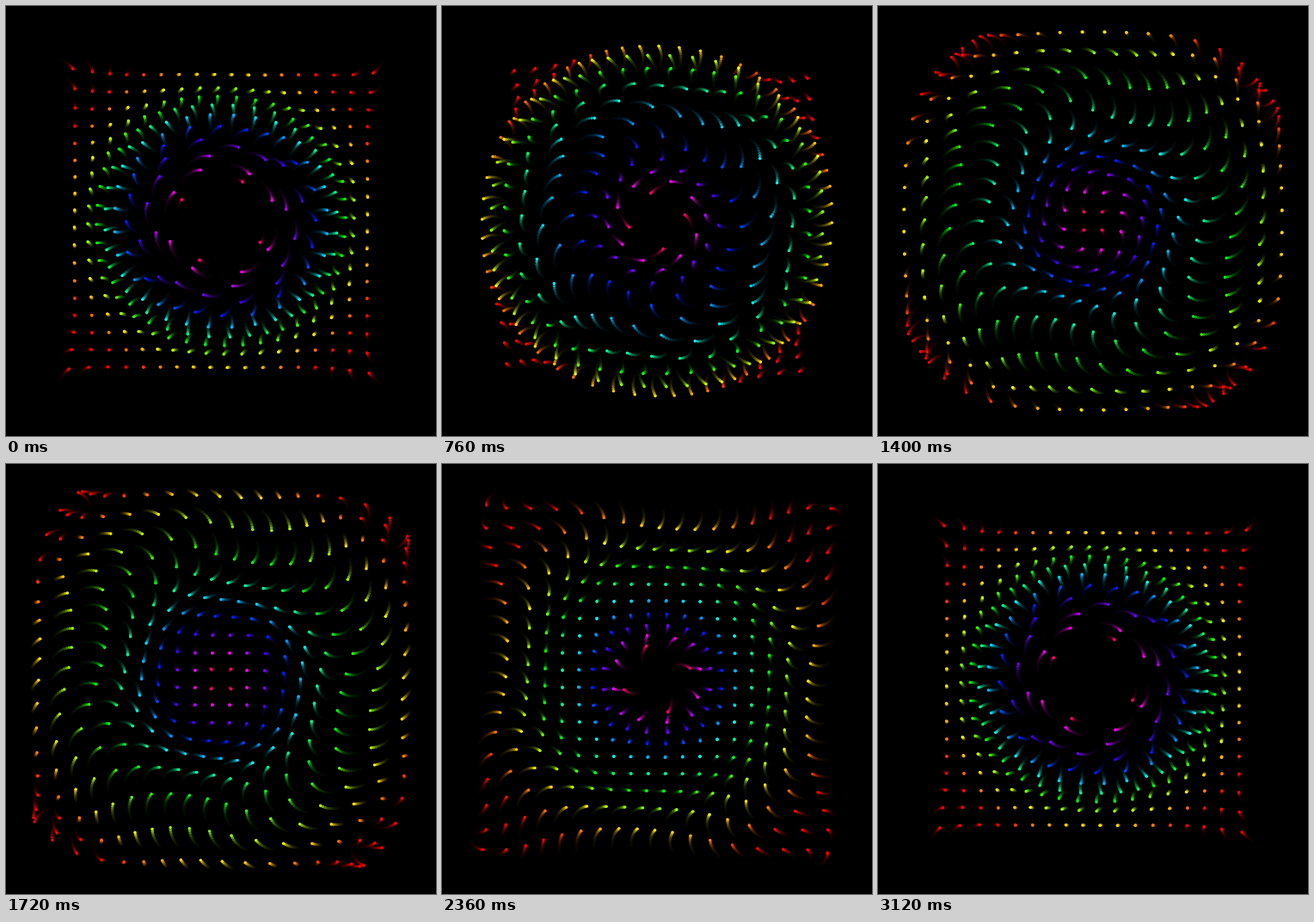
Recreate the animation shown at these times as an HTML page with a canvas. Size 500 by 500 pixels, loop 3160 ms.

```html
<!DOCTYPE html>
<html lang="en">
<head>
<meta charset="utf-8">
<title>Swirling dot grid</title>
<style>
  html, body { margin: 0; width: 100%; height: 100%; overflow: hidden; background: #000; }
  canvas { display: block; width: 500px; height: 500px; }
</style>
</head>
<body>
<canvas id="stage" width="500" height="500"></canvas>
<script>
const ctx = document.getElementById('stage').getContext('2d');
const SIZE = 500, CENTER = SIZE / 2, TAU = Math.PI * 2;
const STEP = 40, FRAMES = 79;          // ms per frame, frames per loop
const COUNT = 18, GAP = 20, DOT = 1.8;
const REACH = 50, WAVE = 0.018, LEAD = 5.2;
const TRAIL = 9, FADE = 0.67;

const dots = [];
for (let row = 0; row < COUNT; row++) {
  for (let col = 0; col < COUNT; col++) {
    const x = (col - (COUNT - 1) / 2) * GAP;
    const y = (row - (COUNT - 1) / 2) * GAP;
    const r = Math.hypot(x, y);
    dots.push({ x, y, r, heading: Math.atan2(y, x), hue: Math.max(0, 360 - 1.8 * r) });
  }
}

const swell = angle => (1 + Math.cos(angle)) / 2;

// Each dot leaves its grid place by a distance and a turn that ripple outwards.
function place(dot, frame) {
  const phase = TAU * (frame + LEAD) / FRAMES;
  const push = REACH * swell(phase - WAVE * dot.r);
  const turn = Math.PI / 2 * swell(phase - 2 * WAVE * dot.r);
  return [
    CENTER + dot.x + push * Math.cos(dot.heading + turn),
    CENTER + dot.y + push * Math.sin(dot.heading + turn)
  ];
}

function draw(frame) {
  ctx.fillStyle = '#000';
  ctx.fillRect(0, 0, SIZE, SIZE);
  for (let age = TRAIL; age >= 0; age--) {
    const light = 50 * FADE ** age;
    for (const dot of dots) {
      const [x, y] = place(dot, frame - age);
      ctx.fillStyle = `hsl(${dot.hue}, 100%, ${light}%)`;
      ctx.beginPath();
      ctx.arc(x, y, DOT, 0, TAU);
      ctx.fill();
    }
  }
}

const start = performance.now();
let shown = -1;
function tick() {
  const frame = Math.floor((performance.now() - start) / STEP) % FRAMES;
  if (frame !== shown) draw(shown = frame);
  requestAnimationFrame(tick);
}
tick();
</script>
</body>
</html>
```
